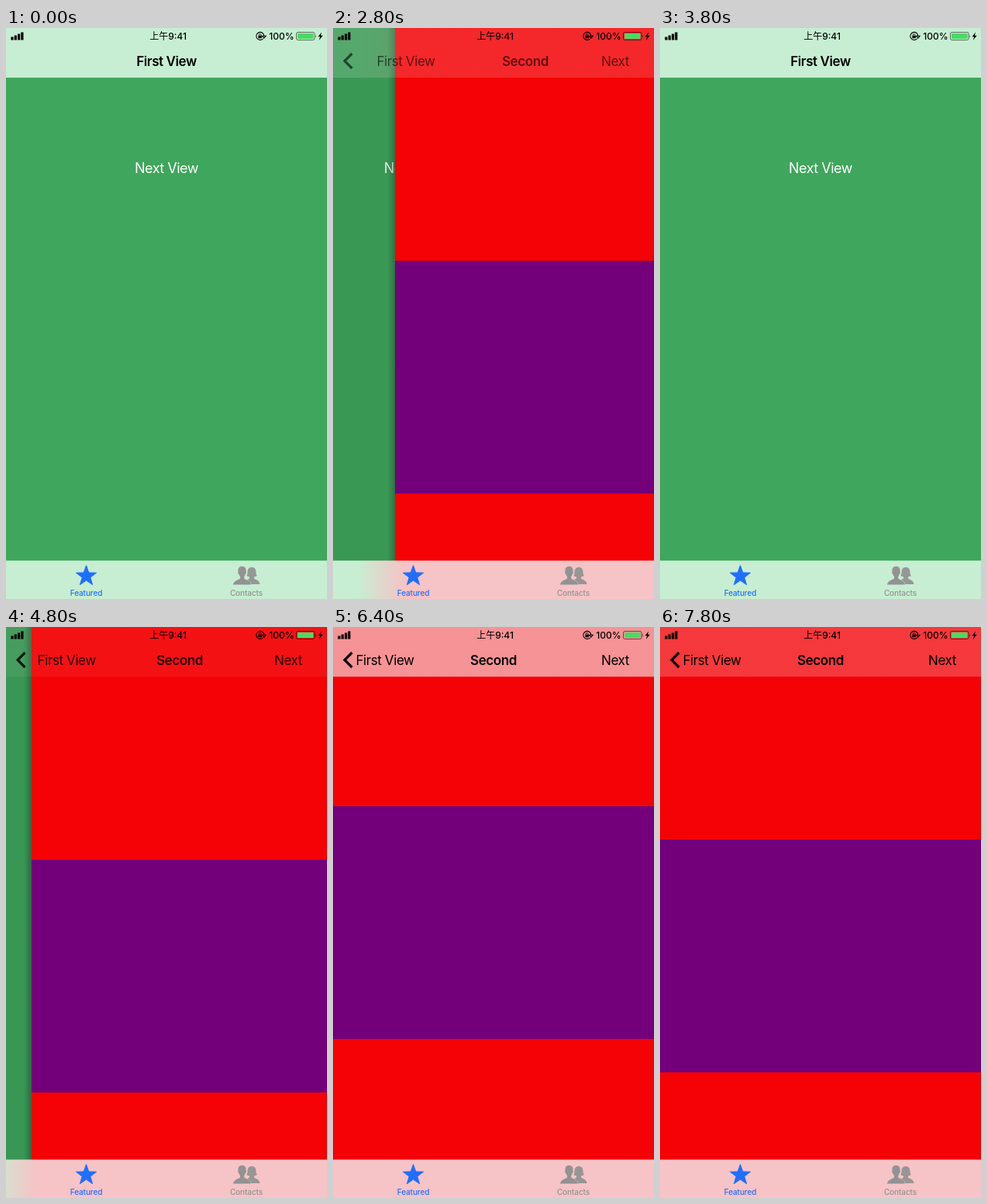
These frames come from a looping animation (414 px wide and 736 px high, 8 s). An HTML page:

```html
<!DOCTYPE html>
<html lang="en">
<head>
<meta charset="utf-8">
<title>Navigation bar fade</title>
<style>
html, body { margin: 0; width: 100%; height: 100%; overflow: hidden; background: #f40205; }
svg { display: block; width: 414px; height: 736px; }
text { font-family: Inter, "Noto Sans CJK SC", "Noto Sans CJK TC", "Noto Sans CJK", sans-serif; }
.nav { font-size: 17px; letter-spacing: -.4px; }
.bold { font-weight: 600; }
.mid { text-anchor: middle; }
.status { font-size: 12px; font-weight: 500; }
.tab { font-size: 10px; font-weight: 500; letter-spacing: -.1px; }
</style>
</head>
<body>
<svg viewBox="0 0 414 736">
  <defs>
    <linearGradient id="blur" gradientUnits="userSpaceOnUse" y1="0" y2="0">
      <stop offset="0" stop-color="#c7eed2"/>
      <stop offset="1" stop-color="#f6c3c6"/>
    </linearGradient>
    <linearGradient id="edge">
      <stop offset="0" stop-opacity="0"/>
      <stop offset="1" stop-opacity=".3"/>
    </linearGradient>
  </defs>

  <g id="first">
    <rect width="414" height="736" fill="#3fa65d"/>
    <text class="mid" x="207" y="187" font-size="18" letter-spacing="-.5" fill="#fff">Next View</text>
  </g>
  <rect id="dim" width="414" height="736"/>

  <g id="second">
    <rect id="shadow" x="-10" width="10" height="736" fill="url(#edge)"/>
    <rect width="414" height="736" fill="#f40205"/>
    <rect id="block" y="300" width="414" height="300" fill="#73007a"/>
  </g>

  <rect id="bar" width="414" height="64" fill="url(#blur)"/>
  <path id="chevron" d="M24.5 33 15 42.5l9.500 9.500" fill="none" stroke="#000" stroke-width="3.200"/>
  <text id="back" class="nav mid" y="48.500">First View</text>
  <text id="firstTitle" class="nav bold mid" y="48.500">First View</text>
  <text id="secondTitle" class="nav bold mid" y="48.500">Second</text>
  <text id="next" class="nav mid" x="364" y="48.500">Next</text>

  <g id="statusBar">
    <path d="M8 15.500v-4M12.300 15.500v-6M16.600 15.500v-8M20.900 15.500v-10" stroke="#000" stroke-width="3.200"/>
    <text class="status mid" x="209" y="15">上午9:41</text>
    <path d="M331.500 13.800A5 5 0 1 1 332.800 10.500M330.500 10.300h4.600l-2.300 2.800z" fill="none" stroke="#000" stroke-width="1.100"/>
    <path d="M325.400 10h4.400v3.200h-4.400z"/>
    <path d="M326.300 10V9a1.300 1.300 0 0 1 2.600 0v1" fill="none" stroke="#000" stroke-width=".9"/>
    <text class="status mid" x="355.500" y="15" font-weight="400">100%</text>
    <rect x="374.500" y="5.500" width="23.500" height="10" rx="2" fill="none" stroke="#000" stroke-opacity=".55"/>
    <rect x="376" y="7" width="20.500" height="7" rx=".8" fill="#4cd964"/>
    <path d="M399 8.500q1.600 2 0 4z" fill-opacity=".6"/>
    <path d="M407 5.500l-4.500 5.700h2.700l-1.500 4.500 5-6h-2.800z"/>
  </g>

  <rect y="686.500" width="414" height="49.500" fill="url(#blur)"/>
  <path id="star" fill="#206eff" stroke="#206eff" stroke-linejoin="round"/>
  <text class="tab mid" x="103.500" y="732.300" fill="#206eff">Featured</text>
  <g fill="#929292" fill-opacity=".95">
    <path d="M317 695c4 0 5.600 3 5.400 6.500.2 2 .8 3.500 1.300 4.500-1.200 1-2.500 1.300-3.700 1.400v2c2 2 7 2 7.500 7.600H306c1-5.500 6-5.800 8-7.600v-2c-1.200-.1-2.500-.4-3.700-1.400.6-1 1.200-2.500 1.300-4.500-.2-3.500 1.400-6.500 5.400-6.500z"/>
    <path d="M304.500 694c3.800 0 5.500 2.600 5 6.500 1 .6.300 3-.8 3.400-.3 1.500-.9 2.400-1.500 3v2.600c2 2 8 2.500 8.800 8H293c.8-5.500 7-6 9-8v-2.600c-.7-.6-1.300-1.500-1.600-3-1.200-.4-1.800-2.800-.8-3.400-.6-3.900 1-6.500 4.900-6.500z"
      fill-opacity="1" stroke="url(#blur)" stroke-width="1" paint-order="stroke"/>
  </g>
  <text class="tab mid" x="310" y="732.300" fill="#929292">Contacts</text>
</svg>

<script>
const LOOP = 8000, STEP = 200, WIDTH = 414;

// [time, share of the first view uncovered]
const REVEAL = [
  [0, 1], [800, 1], [1000, .55], [1200, .08], [1400, 0],
  [2200, 0], [2400, .03], [2600, .1], [2800, .193], [3000, .36],
  [3200, .62], [3400, .9], [3600, 1],
  [4400, 1], [4600, .55], [4800, .08], [5000, 0]
];
// [time, scroll distance]
const SCROLL = [
  [5800, 0], [6000, 10], [6200, 38], [6400, 69], [6600, 95], [6800, 110],
  [7000, 110], [7200, 100], [7400, 76], [7600, 50], [7800, 26]
];

const $ = id => document.getElementById(id);
const clamp = v => Math.max(0, Math.min(1, v));
const set = (id, attrs) => {
  for (const [name, value] of Object.entries(attrs)) $(id).setAttribute(name, value);
};

function valueAt(table, time) {
  const i = table.findIndex(([at]) => at >= time);
  if (i < 0) return table[table.length - 1][1];
  if (i === 0) return table[0][1];
  const [t0, v0] = table[i - 1], [t1, v1] = table[i];
  return v0 + (v1 - v0) * (time - t0) / (t1 - t0);
}

function starPoints(cx, cy, outer, inner) {
  return Array.from({ length: 10 }, (_, i) => {
    const r = i % 2 ? inner : outer, a = i * Math.PI / 5 - Math.PI / 2;
    return `${(cx + r * Math.cos(a)).toFixed(2)} ${(cy + r * Math.sin(a)).toFixed(2)}`;
  }).join("L");
}

function draw(time) {
  const reveal = valueAt(REVEAL, time);
  const scroll = valueAt(SCROLL, time);
  const edge = Math.round(reveal * WIDTH);
  const leaving = clamp(1 - 2.1 * reveal);
  const titleX = 67 + 140 * reveal;
  const blurX = edge * 1.15 - 60;

  set("first", { transform: `translate(${-.3 * WIDTH * (1 - reveal)})` });
  set("dim", { opacity: .1 * (1 - reveal) });
  set("second", { transform: `translate(${edge})` });
  set("shadow", { opacity: 1 - reveal });
  set("block", { y: 300 - scroll });
  set("blur", { x1: blurX, x2: blurX + 60 });
  set("bar", { opacity: clamp(Math.max(reveal, scroll / 92)) });
  set("chevron", { opacity: leaving });
  set("back", { x: titleX, opacity: leaving });
  set("firstTitle", { x: titleX, opacity: clamp((reveal - .4) / .6) });
  set("secondTitle", { x: 207 + 212 * reveal, opacity: leaving });
  set("next", { opacity: leaving });
}

function tick() {
  const time = performance.now() % LOOP;
  draw(Math.floor(time / STEP) * STEP);
  requestAnimationFrame(tick);
}

set("star", { d: `M${starPoints(103.5, 706.5, 13.8, 5.6)}Z` });
tick();
</script>
</body>
</html>
```
